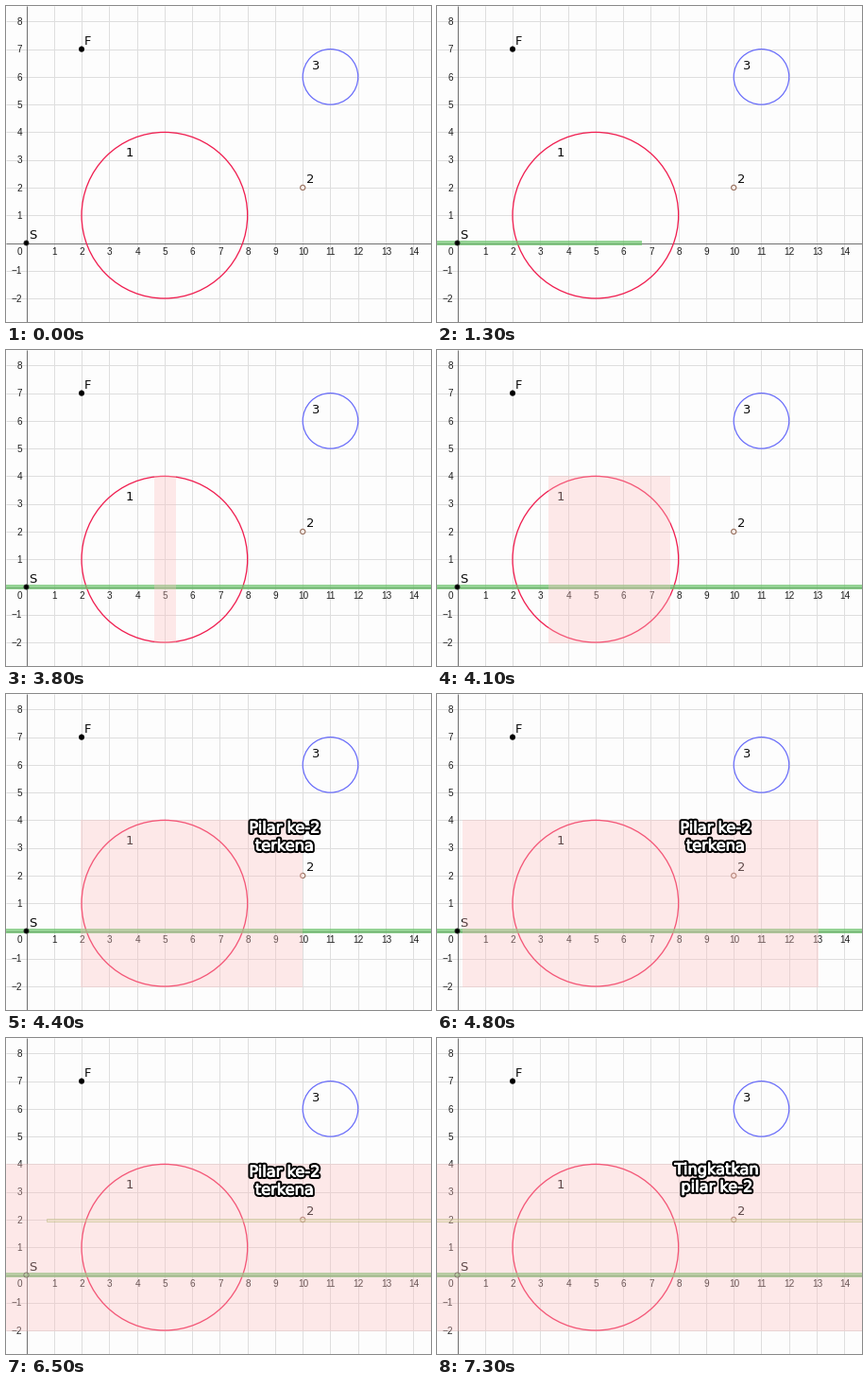
Recreate the animation shown at these times as a matplotlib script. Size 450 by 334 pixels, loop 8 s.

```python
import numpy as np
import matplotlib.pyplot as plt
from matplotlib.animation import FuncAnimation
from matplotlib.patches import Circle, Rectangle
from matplotlib.patheffects import Normal, Stroke

W, H, DPI = 450, 334, 100
PX = 72 / DPI            # one pixel in points
OX, OY, UNIT = 21.5, 250.5, 29.27
STEP = 100               # ms per frame

fig = plt.figure(figsize=(W / DPI, H / DPI), dpi=DPI, facecolor="#fdfdfd")
ax = fig.add_axes([0, 0, 1, 1])
ax.set_xlim(0, W)
ax.set_ylim(H, 0)
ax.axis("off")


def sx(x):
    return OX + UNIT * x


def sy(y):
    return OY - UNIT * y


def label(x, y, text, size=13, font="DejaVu Sans", color="#080808", ha="center"):
    return ax.text(x, y, text, size=size * PX, family=font, color=color,
                   ha=ha, va="baseline", zorder=6)


def ring(x, y, r, color, width, fill="none", z=4):
    patch = Circle((sx(x), sy(y)), r, ec=color, fc=fill, lw=width * PX, zorder=z)
    return ax.add_patch(patch)


def band(y, height, color, z, edge="none"):
    patch = Rectangle((0, y), 0, height, fc=color, ec=edge, lw=0.8 * PX, zorder=z)
    return ax.add_patch(patch)


def caption(first, second, x, base, gap):
    effects = [Stroke(linewidth=5 * PX, foreground="black"),
               Stroke(linewidth=0.9 * PX, foreground="white"), Normal()]
    return [ax.text(x, base + i * gap, text, size=16.2 * PX, family="DejaVu Sans",
                    color="white", ha="center", va="baseline",
                    path_effects=effects, zorder=12)
            for i, text in enumerate((first, second))]


# Grid, axes and tick numbers
ax.vlines(sx(np.arange(1, 15)), 0, H, color="#dedede", lw=PX, zorder=2)
ax.hlines(sy(np.arange(-2, 9)), 0, W, color="#dedede", lw=PX, zorder=2)
ax.vlines(OX, 0, H, color="#707070", lw=PX, zorder=3)
ax.hlines(OY, 0, W, color="#707070", lw=PX, zorder=3)
ax.vlines(W - 0.5, 0, H, color="#a0a0a0", lw=PX, zorder=11)

tick = dict(size=10, font="Liberation Sans", color="#202020")
for n in range(1, 15):
    label(sx(n) + 0.5, 262.7, str(n), **tick)
for n in range(-2, 9):
    y = sy(n) + 3.7 if n else 262.7
    label(17.2, y, str(n).replace("-", "\u2212"), ha="right", **tick)

# Points and pillars
ring(5, 1, 3 * UNIT, "#f01e50", 1.3)
ring(11, 6, UNIT, "#6468fa", 1.2)
ring(10, 2, 2.6, "#9c7767", 1.2, fill="#f6eeea", z=7)
origin = ring(0, 0, 2.6, "#303030", 0.7, fill="black", z=7)
ring(2, 7, 2.9, "black", 0.3, fill="black", z=7)
for x, y, text in [(86.5, 41, "F"), (28.7, 246, "S"), (131.2, 159, "1"),
                   (321.7, 187, "2"), (327.5, 66.7, "3")]:
    label(x, y, text)

# Moving bands
first_beam = band(248.2, 4.8, ("#6cc46c", 0.72), 5)
pink = band(sy(4) - 0.9, 6 * UNIT + 1.5, ("#fdc1c1", 0.35), 8)
second_beam = band(191, 3, ("#e6dcae", 0.4), 9, edge=("#a8b06c", 0.5))

hit = caption("Pilar ke-2", "terkena", 295, 146.5, 19)
raise_it = caption("Tingkatkan", "pilar ke-2", 296.5, 144, 18.5)


def span(patch, left, right, shown):
    """Stretch a band sideways; its ends leave the stage when fully open."""
    left, right = max(left, -3), min(right, W + 3)
    patch.set_x(left)
    patch.set_width(right - left)
    patch.set_visible(shown)


def draw(i):
    reach = 21.8 * (i - 4)
    span(first_beam, 21 - reach, 21 + reach, i >= 5)

    k = i - 38
    left = 157 - 13 * k
    span(pink, left, 180 + 22.4 * k, k >= 0)
    origin.set_fill(left > OX)   # the dot turns hollow once covered

    k = i - 57
    half = 10 + 31.7 * k
    span(second_beam, 306.5 - half, 306.5 + half, k >= 0)

    for t in hit:
        t.set_visible(44 <= i < 73)
    for t in raise_it:
        t.set_visible(i >= 73)
    return [first_beam, pink, second_beam, origin, *hit, *raise_it]


anim = FuncAnimation(fig, draw, frames=80, interval=STEP, repeat=True,
                     repeat_delay=0, blit=False)
plt.show()
```
